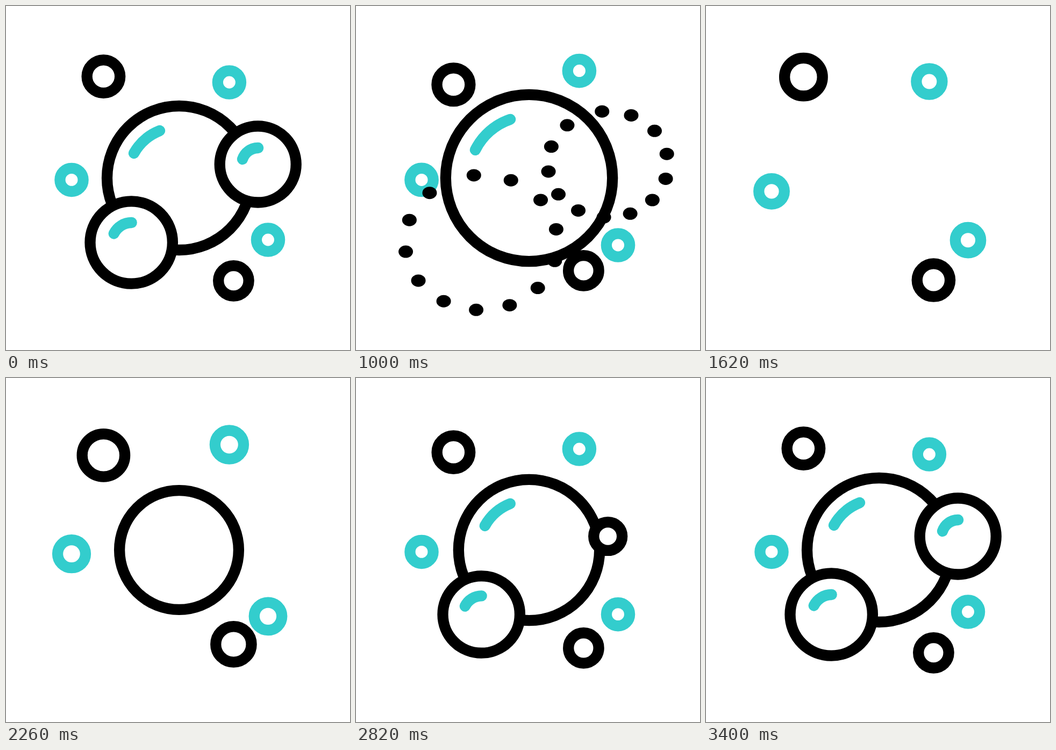
These frames come from a looping animation (640 by 640 pixels, 3.6 s). An HTML page:

```html
<!DOCTYPE html>
<html lang="en">
<head>
<meta charset="utf-8">
<title>Bubbles</title>
<style>
html, body { margin: 0; width: 100%; height: 100%; overflow: hidden; background: #fff; }
svg { display: block; width: 100vw; height: 100vh; }
</style>
</head>
<body>
<svg id="stage" viewBox="0 0 640 640" fill="none" stroke-width="20.3" stroke-linecap="round"></svg>
<script>
const LOOP = 3600, INK = '#000', CYAN = '#33cdcd';
const DOTS = 13, STRETCH = 1.13, BURST = 250;
const stage = document.getElementById('stage');

const clamp = u => Math.max(0, Math.min(1, u));
const span = (t, a, b) => clamp((t - a) / (b - a));
const ease = u => (1 - Math.cos(Math.PI * u)) / 2;
const easeOut = u => Math.sin(u * Math.PI / 2);
const mix = (a, b, u) => a + (b - a) * u;
const rad = deg => deg * Math.PI / 180;

function add(parent, tag, attrs) {
  const el = document.createElementNS('http://www.w3.org/2000/svg', tag);
  parent.append(el);
  return set(el, attrs);
}
function set(el, attrs) {
  for (const k in attrs) el.setAttribute(k, attrs[k]);
  return el;
}
const show = (el, on) => set(el, { visibility: on ? 'visible' : 'hidden' });

// Small rings drift up and down and swell; "late" ones only drift in the middle.
const rings = [
  { x: 181.4, y: 131.1, dy: 15.2, r: 30.8, swell: 9, color: INK },
  { x: 415.4, y: 142, dy: -21.5, r: 21.6, swell: 5, color: CYAN },
  { x: 122, y: 323.4, dy: 23, r: 21.6, swell: 4.4, color: CYAN, late: true },
  { x: 487.5, y: 435, dy: 10, r: 21.6, swell: 4.2, color: CYAN },
  { x: 423.4, y: 511.3, dy: -19, r: 28.2, swell: 5, color: INK }
];
const START = 320, LEG = 710;

function drift(t, late) {
  const u = clamp((t - START) / (4 * LEG)) * 4;
  if (late) return u > 1 && u < 3 ? ease(u - 1) : 0;
  return ease(u);
}
const pulse = t => [675, 1443, 2242].reduce((sum, c) => sum + ease(clamp(1 - Math.abs(t - c) / 355)), 0);

// grow: [start, end, amount]; burst: [start, first ry, last ry];
// back: [start, peak, dip, rest]; peak and dip are scales.
// shine: two end points and how far each moves per unit of growth.
const bubbles = [
  { x: 322, y: 320, r: 134, grow: [770, 1250, 45], burst: [1250, 164, 210],
    back: [2090, 2490, 2700, 2920], peak: 1.33, dip: 0.95,
    shine: [[-84, -46, -0.76, -0.29], [-36, -88, 0.05, -1]] },
  { x: 468.7, y: 294.5, r: 71, grow: [400, 900, 28], burst: [900, 89, 117],
    back: [2774, 3080, 3240, 3400], peak: 1.56, dip: 0.94,
    shine: [[-28.7, -9.5, -0.89, -0.33], [0.5, -30.5, -0.28, -0.78]] },
  { x: 233.2, y: 440, r: 76.7, grow: [300, 780, 38], burst: [800, 105, 127.7],
    back: [2370, 2670, 2820, 3000], peak: 1.58, dip: 0.935,
    shine: [[-32.5, -16.5, -1.1, -0.42], [0.5, -37, -0.28, -0.9]] }
];

for (const ring of rings) ring.el = add(stage, 'circle', { cx: ring.x, stroke: ring.color });
for (const b of bubbles) {
  const g = add(stage, 'g', { transform: `translate(${b.x} ${b.y})` });
  b.body = add(g, 'circle', { fill: '#fff', stroke: INK });
  b.glint = add(g, 'path', { stroke: CYAN, pathLength: 1 });
  b.dots = Array.from({ length: DOTS }, () => add(g, 'ellipse', { fill: INK }));
}

function radius(b, t) {
  const [start, top, low, rest] = b.back;
  if (t < b.burst[0]) return b.r + b.grow[2] * ease(span(t, b.grow[0], b.grow[1]));
  if (t <= start) return 0;
  if (t < top) return b.r * b.peak * easeOut(span(t, start, top));
  if (t < low) return b.r * mix(b.peak, b.dip, ease(span(t, top, low)));
  return b.r * mix(b.dip, 1, ease(span(t, low, rest)));
}

function drawGlint(b, t, r) {
  const [start, top] = b.back;
  const part = t < b.burst[0] ? 1 : span(t, mix(start, top, 0.65), top);
  show(b.glint, part > 0);
  if (!part) return;
  const [p, q] = b.shine.map(([x, y, dx, dy]) => {
    const d = r - b.r, k = r / b.r;
    return d < 0 ? [x * k, y * k] : [x + dx * d, y + dy * d];
  });
  const arc = (Math.hypot(...p) + Math.hypot(...q)) / 2;
  set(b.glint, {
    d: `M${p} A${arc} ${arc} 0 0 1 ${q}`,
    'stroke-dasharray': part < 1 ? `${part} 2` : 'none'
  });
}

// The dashes are a little wider apart on the right-hand side.
function dotAngle(i) {
  const a = rad(-6.3 + 27.05 * i);
  return a + rad(1 + 3 * Math.sin(a));
}

function drawDots(b, t) {
  const [start, from, to] = b.burst;
  const u = (t - start) / BURST;
  const on = u >= 0 && u < 1.2;
  const ry = mix(from, to, ease(clamp(u)));
  const size = 1 - span(u, 0.82, 1.2);
  b.dots.forEach((dot, i) => {
    show(dot, on);
    if (!on) return;
    const a = dotAngle(i);
    set(dot, {
      cx: Math.sin(a) * ry * STRETCH, cy: -Math.cos(a) * ry,
      rx: 13.5 * size, ry: 11.5 * size
    });
  });
}

function draw(t) {
  const swell = pulse(t);
  for (const ring of rings) {
    set(ring.el, { cy: ring.y + ring.dy * drift(t, ring.late), r: ring.r + ring.swell * swell });
  }
  for (const b of bubbles) {
    const r = radius(b, t);
    show(b.body, r > 0);
    set(b.body, { r });
    drawGlint(b, t, r);
    drawDots(b, t);
  }
}

const begin = performance.now();
function tick() {
  draw((performance.now() - begin) % LOOP);
  requestAnimationFrame(tick);
}
draw(0);
requestAnimationFrame(tick);
</script>
</body>
</html>
```
